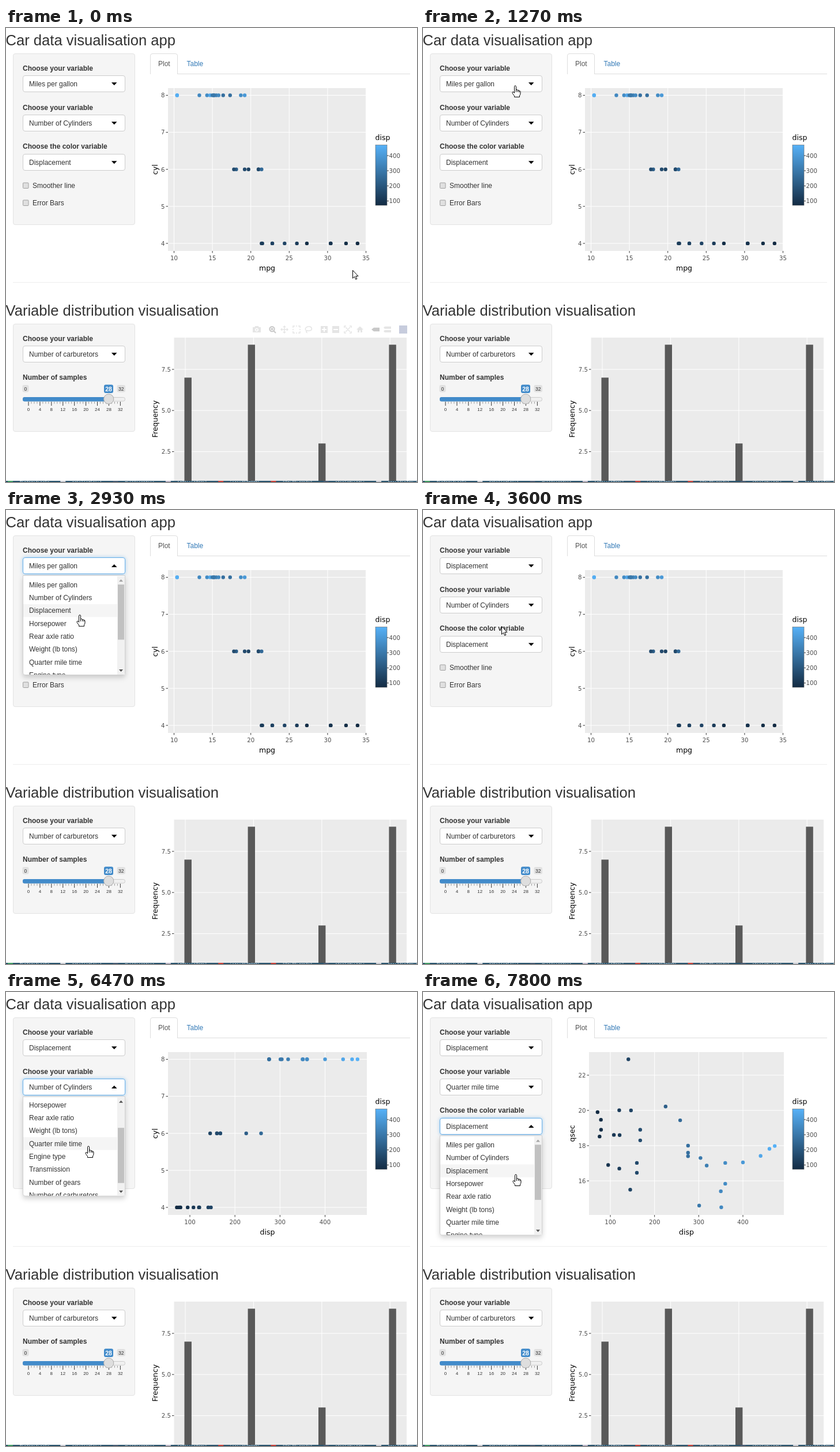
Write an HTML page that moves like this. It is 713x786 px and loops after 8 s.

```html
<!DOCTYPE html>
<html lang="en">
<head>
<meta charset="utf-8">
<title>Car data visualisation app</title>
<style>
  html, body { margin: 0; width: 100%; height: 100%; overflow: hidden; background: #fff; }
  svg { display: block; width: 100%; height: 100%; }
  text { font-family: "Liberation Sans", Arial, sans-serif; font-size: 12px; fill: #333; white-space: pre; }
  .h { font-size: 25.6px; }
  .b { font-weight: bold; }
  .tick { font-family: "DejaVu Sans", Verdana, sans-serif; font-size: 10.2px; fill: #4d4d4d; }
  .title { font-family: "DejaVu Sans", Verdana, sans-serif; font-size: 12.5px; fill: #000; }
  .small { font-size: 8.6px; }
  .mid { text-anchor: middle; }
  .end { text-anchor: end; }
  .grid { stroke: #fff; fill: none; }
  .axis { stroke: #333; fill: none; }
  .glow { filter: drop-shadow(0 0 3px rgba(102,175,233,.6)); }
  .menu { filter: drop-shadow(0 4px 4px rgba(0,0,0,.18)); }
</style>
</head>
<body>
<svg id="stage" viewBox="0 0 713 786" preserveAspectRatio="none"></svg>
<script>
const LOOP = 8000, STEP = 200 / 3, BLINK = 1600 / 3;
const ROW = 22.3, GAP = 67.7;

const mpg = [21,21,22.8,21.4,18.7,18.1,14.3,24.4,22.8,19.2,17.8,16.4,17.3,15.2,10.4,10.4,
  14.7,32.4,30.4,33.9,21.5,15.5,15.2,13.3,19.2,27.3,26,30.4,15.8,19.7,15,21.4];
const disp = [160,160,108,258,360,225,360,146.7,140.8,167.6,167.6,275.8,275.8,275.8,472,460,
  440,78.7,75.7,71.1,120.1,318,304,350,400,79,120.3,95.1,351,145,301,121];
const qsec = [16.46,17.02,18.61,19.44,17.02,20.22,15.84,20,22.9,18.3,18.9,17.4,17.6,18,17.98,17.82,
  17.42,19.47,18.52,19.9,20.01,16.87,17.3,15.41,17.05,18.9,16.7,16.9,14.5,15.5,14.6,18.6];
const cyl = [...'66468684466888888444488884448684'].map(Number);

const options = ['Miles per gallon', 'Number of Cylinders', 'Displacement', 'Horsepower', 'Rear axle ratio',
  'Weight (lb tons)', 'Quarter mile time', 'Engine type', 'Transmission', 'Number of gears', 'Number of carburetors'];

const text = (x, y, s, cls = '', extra = '') => `<text x="${x}" y="${y}" class="${cls}" ${extra}>${s}</text>`;
const rect = (x, y, w, h, fill, extra = '') => `<rect x="${x}" y="${y}" width="${w}" height="${h}" fill="${fill}" ${extra}/>`;
const path = (d, extra = '') => `<path d="${d}" ${extra}/>`;
const range = (n, f) => Array.from({ length: n }, (_, i) => f(i)).join('');
const vertical = (y, s) => text(0, 0, s, 'title mid', `transform="translate(262.5 ${y}) rotate(-90)"`);

function shade(d) {
  const k = (d - 71.1) / 400.9;
  return `rgb(${[[19, 86], [43, 177], [67, 247]].map(([a, b]) => Math.round(a + (b - a) * k))})`;
}

function select(y, id, label) {
  return rect(29.5, y + .5, 177, 28, '#fff', `rx="3.5" stroke="#ccc" id="box${id}"`) +
    text(40, y + 18.8, label, '', `id="value${id}"`) +
    path('M-4.8-2.4H4.8L0 2.6Z', `id="arrow${id}" transform="translate(187.7 ${y + 14.6})"`);
}

function scatter(id, left, right, xs, ys, xTicks, yTicks, fx, fy, xName, yName) {
  const mid = (left + right) / 2;
  return `<g id="plot${id}">` + rect(left, 104, right - left, 282, '#ebebeb') +
    xTicks.map(v => path(`M${fx(v)} 104V386`, 'class="grid"') + path(`M${fx(v)} 386v3.5`, 'class="axis"') +
      text(fx(v), 402, v, 'tick mid')).join('') +
    yTicks.map(v => path(`M${left} ${fy(v)}H${right}`, 'class="grid"') + path(`M${left} ${fy(v)}h-3.5`, 'class="axis"') +
      text(left - 5.5, fy(v) + 3.8, v, 'tick end')).join('') +
    xs.map((v, i) => `<circle cx="${fx(v).toFixed(2)}" cy="${fy(ys[i]).toFixed(2)}" r="3.2" fill="${shade(disp[i])}"/>`).join('') +
    text(mid, 419.5, xName, 'title mid') + vertical(245, yName) + '</g>';
}

// [x, path, stroke width (0 = filled), active]
const icons = [
  [435, 'M-7-4h3l1.5-2h5l1.5 2h3v9h-14ZM0-2.5a3 3 0 1 0 .01 0ZM0-1a1.5 1.5 0 1 1-.01 0Z', 0],
  [462, 'M-.5-5a4.2 4.2 0 1 0 .01 0ZM2.5 2.5L6 6M-2.5-.8h4M-.5-2.8v4', 2, 1],
  [483, 'M-6 0H6M0-6V6M-4-2L-6 0-4 2M4-2L6 0 4 2M-2-4L0-6 2-4M-2 4L0 6 2 4', 1.4],
  [504, 'M-6-3v-3h3M-1-6h2M3-6h3v3M6-1v2M6 3v3h-3M1 6h-2M-3 6h-3v-3M-6 1v-2', 1.6],
  [525, 'M-4 2C-9-2-2-6 2-5S7 1 2 2-3 1-4 3-2 5-3 6', 1.6],
  [552, 'M-6-6h12v12h-12ZM-1-4h2v3h3v2h-3v3h-2v-3h-3v-2h3Z', 0],
  [572, 'M-6-6h12v12h-12ZM-4-1h8v2h-8Z', 0],
  [593, 'M-6-3v-3h3M3-6h3v3M6 3v3h-3M-3 6h-3v-3M-4-4L4 4M-4 4L4-4', 1.5],
  [614, 'M-6 0L0-5.5 6 0H4V5H1V1.5H-1V5H-4V0Z', 0],
  [641, 'M-7 0L-3-3.2H7V3.2H-3Z', 0, 1],
  [662, 'M-7-3.2L-5-5.2H6V-1.2H-5ZM-7 3L-5 1H6V5H-5Z', 0]
];
const modebar = (id, y) => `<g id="bar${id}">` + icons.map(([x, d, w, on]) => {
  const ink = `rgba(68,68,68,${on ? .65 : .3})`;
  return path(d, `transform="translate(${x} ${y})" fill-rule="evenodd" ` +
    (w ? `fill="none" stroke="${ink}" stroke-width="${w}"` : `fill="${ink}"`));
}).join('') + rect(682, y - 7, 14, 14, '#8490b4') + '</g>';

function histogram() {
  const bars = [[309.5, 605.3], [419.6, 548.3], [542, 719.3], [664.4, 548.3]];
  return rect(291.5, 536, 403.5, 248, '#ebebeb') +
    range(4, i => path(`M${311 + i * 118.4} 536V784`, 'class="grid"')) +
    range(3, i => {
      const y = 591 + i * 71.2;
      return path(`M291.5 ${y}H695`, 'class="grid"') + path(`M291.5 ${y}h-3.5`, 'class="axis"') +
        text(286, y + 3.8, (7.5 - i * 2.5).toFixed(1), 'tick end');
    }) +
    bars.map(([x, y]) => rect(x, y, 12.4, 784 - y, '#595959')).join('') + vertical(677, 'Frequency');
}

function slider() {
  return rect(28.5, 618, 11, 12.5, '#e1e1e1', 'rx="3"') + text(34, 627.5, '0', 'small mid') +
    rect(192.5, 618, 14.5, 12.5, '#e1e1e1', 'rx="3"') + text(199.8, 627.5, '32', 'small mid') +
    rect(170, 617.5, 16, 14.5, '#428bca', 'rx="3"') +
    text(178, 628.7, '28', 'b mid', 'style="font-size:10.5px;fill:#fff"') +
    rect(29.5, 639.5, 177, 6.5, '#f0f0f0', 'rx="3" stroke="#ccc"') +
    rect(29, 639, 149, 7.5, '#428bca', 'rx="3"') +
    range(33, i => path(`M${39 + i * 4.98} 647v${i % 4 ? 3.5 : 7}`, `stroke="${i % 4 ? '#999' : '#333'}"`)) +
    range(9, i => text(39 + i * 19.92, 663.3, i * 4, 'mid', 'style="font-size:8px"')) +
    `<circle cx="178.2" cy="642.3" r="8.6" fill="#dedede" stroke="#aaa"/>`;
}

function taskbar() {
  let seed = 7;
  const rnd = () => (seed = seed * 16807 % 2147483647) / 2147483647;
  const dots = ['#3c9a5f', '#c9ccd4', '#41566f', '#b9b4c6', '#c23b35', '#c23b35', '#41566f', '#c9ccd4'];
  return rect(0, 784, 713, 2, '#24506a') + dots.map((c, i) =>
    rect(3 + i * 91.3, 784, 9, 2, c) +
    range(13, j => rect(24 + i * 91.3 + j * 4, 784.3 + rnd(), 1 + rnd() * 2.5, 1, '#b4c3cf'))).join('');
}

const well = (y, h) => rect(12.5, y + .5, 211, h, '#f5f5f5', 'rx="3.5" stroke="#e3e3e3"');
const check = (y, s) => rect(29.5, y - 4.5, 9.5, 9.5, '#e0e0e0', 'rx="1" stroke="#a0a0a0"') + text(46, y + 4.3, s);

function legend() {
  return text(640.5, 193.5, 'disp', 'title') + rect(641, 202.5, 20, 104.5, 'url(#ramp)', 'stroke="#666" stroke-width=".6"') +
    range(4, i => path(`M661 ${220.9 + i * 26.2}h3`, 'class="axis"') + text(664.5, 224.8 + i * 26.2, 400 - i * 100, 'tick'));
}

function menu() {
  return `<g id="menu">` + path('M29.5 0H206.5V168.5Q206.5 172 203 172H33Q29.5 172 29.5 168.5Z', 'fill="#fff" stroke="#d0d0d0" class="menu"') +
    `<g clip-path="url(#view)"><g id="items">` + rect(30, 0, 163, ROW, '#f5f5f5', 'id="active"') +
    options.map((s, i) => text(40, 20.3 + i * ROW, s)).join('') + '</g></g>' +
    rect(193, 1.5, 13, 170, '#f1f1f1') + rect(194, 15.5, 11, 95.5, '#c1c1c1', 'id="thumb"') +
    path('M196 10.5h7l-3.5-4Z', 'id="up"') + path('M196 162.5h7l-3.5 4Z', 'fill="#505050"') + '</g>';
}

document.getElementById('stage').innerHTML =
  `<defs><linearGradient id="ramp" x2="0" y2="1"><stop stop-color="#56b1f7"/><stop offset="1" stop-color="#132b43"/></linearGradient>
   <clipPath id="view"><rect x="30" y="1" width="163" height="170.5"/></clipPath></defs>` +
  rect(0, 0, 713, 786, '#fff') +
  text(-.5, 30, 'Car data visualisation app', 'h') + text(-.5, 498, 'Variable distribution visualisation', 'h') +
  well(44, 296) + well(512, 186) +
  text(29, 73.8, 'Choose your variable', 'b') + text(29, 141.5, 'Choose your variable', 'b') +
  text(29, 209.2, 'Choose the color variable', 'b') + text(29, 542, 'Choose your variable', 'b') + text(29, 609.3, 'Number of samples', 'b') +
  select(82, 0, options[0]) + select(150, 1, options[1]) + select(218, 2, options[2]) + select(550, 3, options[10]) +
  check(272.5, 'Smoother line') + check(302.5, 'Error Bars') + slider() +
  path('M250 79.5H701', 'stroke="#ddd"') +
  path('M250.5 80V48Q250.5 44.5 254 44.5H294Q297.5 44.5 297.5 48V80', 'fill="#fff" stroke="#ddd"') +
  text(264, 66, 'Plot', '', 'style="fill:#555"') + text(313.5, 66, 'Table', '', 'style="fill:#337ab7"') +
  path('M12 440.5H701', 'stroke="#eee"') +
  scatter(0, 281, 625, mpg, cyl, [10, 15, 20, 25, 30, 35], [4, 5, 6, 7, 8],
    v => 291.5 + (v - 10) * 13.32, v => 116.5 + (8 - v) * 64.1, 'mpg', 'cyl') +
  scatter(1, 281, 626, disp, cyl, [100, 200, 300, 400], [4, 5, 6, 7, 8],
    v => 319 + (v - 100) * .7817, v => 116.5 + (8 - v) * 64.1, 'disp', 'cyl') +
  scatter(2, 288, 626, disp, qsec, [100, 200, 300, 400], [16, 18, 20, 22],
    v => 325 + (v - 100) * .7667, v => 144 + (22 - v) * 30.5, 'disp', 'qsec') +
  legend() + histogram() + modebar(0, 90) + modebar(1, 522) + taskbar() + menu() +
  path('M0 0v13', 'id="caret" stroke="#222"') +
  `<g id="cursor">` +
  path('M.5 .5V14.3L3.6 11.4 5.7 16.2 7.8 15.3 5.8 10.6H10Z', 'id="pointer" fill="#fff" stroke="#000"') +
  path('M-1.5 1.5Q-1.5 0 0 0T1.5 1.5V7Q4 6 4.5 8Q6.5 7 7 9Q9 8.5 9 10.5V13Q9 16 7.5 17V19.5H-1.5V17.5L-4.5 13.5Q-6 11-4 10.5Q-3 10.5-1.5 12.5ZM1.5 7v4M4.5 8v3M7 9v2.5',
    'id="hand" fill="#fff" stroke="#000"') +
  path('M-3-6.5H-1L0-5.5 1-6.5H3M0-5.5V5.5M-3 6.5H-1L0 5.5 1 6.5H3', 'id="beam" fill="none" stroke="#000" stroke-width="1.2"') + '</g>';

const ids = {};
document.querySelectorAll('[id]').forEach(n => ids[n.id] = n);
const show = (id, on) => ids[id].style.display = on ? '' : 'none';
const move = (id, x, y) => ids[id].setAttribute('transform', `translate(${x} ${y})`);
const ramp = (t, a, b) => Math.min(1, Math.max(0, (t - a) / (b - a)));
const ease = k => k * k * (3 - 2 * k);

const track = [[0, 601, 419], [600, 247, 156], [870, 160, 100], [1270, 160, 100], [1530, 149.5, 97], [2060, 149.5, 97],
  [2400, 133, 221], [2600, 131, 204], [2800, 131, 204], [3000, 127, 174], [3330, 127, 174], [3600, 136, 201],
  [3800, 150, 170], [4000, 150, 170], [4530, 157, 290], [6200, 157, 290], [6460, 143, 267], [6600, 143, 267],
  [7000, 150, 236], [7200, 150, 236], [7800, 161, 316], [LOOP, 161, 316]];
// opening, closing, caret x
const opened = [[1530, 3330, 125], [3800, 6530, 150.5], [7200, LOOP, 114]];

function cursorAt(t) {
  const i = Math.max(1, track.findIndex(k => k[0] > t));
  const [a, x, y] = track[i - 1], [b, u, v] = track[i];
  const k = ease(ramp(t, a, b));
  return [x + (u - x) * k, y + (v - y) * k];
}

function render(now) {
  const t = Math.floor((now + 5) / STEP) * STEP;
  const [cx, cy] = cursorAt(t);
  const open = opened.findIndex(([a, b]) => t >= a && t < b);
  const plot = t < 3730 ? 0 : t < 6930 ? 1 : 2;
  for (let i = 0; i < 3; i++) {
    const on = i === open, y = 96.6 + i * 68;
    show('plot' + i, i === plot);
    ids['box' + i].setAttribute('stroke', on ? '#66afe9' : '#ccc');
    ids['box' + i].setAttribute('class', on ? 'glow' : '');
    ids['arrow' + i].setAttribute('transform', `translate(187.7 ${y}) scale(1 ${on ? -1 : 1})`);
  }
  ids.value0.textContent = options[t < 3330 ? 0 : 2];
  ids.value1.textContent = options[t < 6530 ? 1 : 6];

  ids.bar0.style.opacity = ramp(t, 60, 300) * (1 - ramp(t, 600, 870));
  ids.bar1.style.opacity = .45 * (1 - ramp(t, 0, 200));

  const top = 113.5 + open * GAP;
  const inList = open >= 0 && cy > top && cy < top + 172;
  show('menu', open >= 0);
  if (open >= 0) {
    const scroll = open === 1 ? 68.6 * ease(ramp(t, 4060, 4270)) : 0;
    const row = inList ? Math.max(0, Math.floor((cy - top - 4.9 + scroll) / ROW)) : open;
    move('menu', 0, top);
    move('items', 0, -scroll);
    move('thumb', 0, scroll * .561);
    ids.active.setAttribute('y', 4.9 + row * ROW);
    ids.up.setAttribute('fill', scroll ? '#505050' : '#a3a3a3');
    move('caret', opened[open][2], 90.3 + open * GAP);
  }
  show('caret', open >= 0 && Math.floor((t - opened[open][0]) / BLINK) % 2 === 0 && !(open === 0 && t > 2860));

  const over = cx > 29 && cx < 207 ? [82, 150, 218].findIndex(y => cy >= y && cy <= y + 29) : -1;
  const kind = inList ? 'hand' : over < 0 ? 'pointer' : over === open ? 'beam' : 'hand';
  ['pointer', 'hand', 'beam'].forEach(k => show(k, k === kind));
  move('cursor', cx, cy);
}

const start = performance.now();
(function tick() {
  render((performance.now() - start) % LOOP);
  requestAnimationFrame(tick);
})();
</script>
</body>
</html>
```
